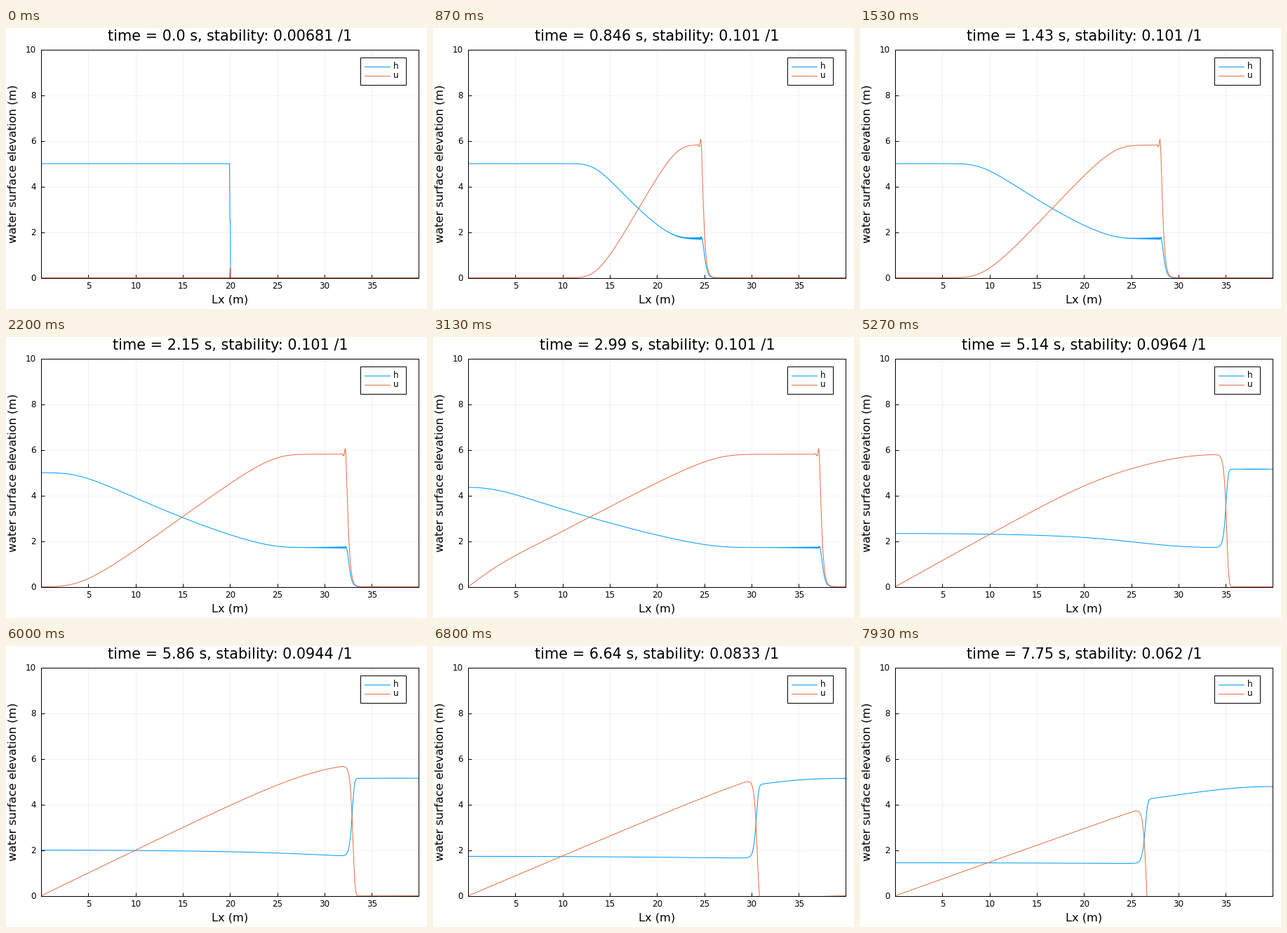
Animation of 600x400 px, one loop 8000 ms. Source, as a matplotlib script:

```python
import numpy as np
import matplotlib
import matplotlib.pyplot as plt
from matplotlib.animation import FuncAnimation
from matplotlib.patches import Rectangle

matplotlib.rcParams["path.simplify"] = False
matplotlib.rcParams["font.family"] = "DejaVu Sans"

W, H, DPI = 600, 400, 100
FRAMES = 120
INTERVAL = 66.63                 # a hair under 1/15 s, to land on 10 ms marks
STEPS = 100                      # solver steps between frames

LENGTH, CELLS, G = 40.0, 1024, 9.81
DX = LENGTH / CELLS
RATIO = 1 / 60                   # dt / dx
DT = RATIO * DX
PX = 72 / DPI                    # one pixel in points
SMALL, MEDIUM, LARGE = (pt * 16 / 15 for pt in (8, 11, 14))
BLUE, ORANGE = "#009afa", "#e36f47"


def simulate():
    """Dam break between two walls: averaged step for h, plain step for u."""
    h = np.zeros(CELLS + 2)
    h[:CELLS // 2 + 1] = 5.0
    u = np.zeros(CELLS + 2)
    states = []
    for step in range(STEPS * (FRAMES - 1) + 1):
        h[0], h[-1] = h[1], h[-2]
        u[0], u[-1] = -u[1], -u[-2]
        flux = u * h
        head = 0.5 * u * u + G * h
        h[1:-1] = 0.5 * (h[2:] + h[:-2]) - 0.5 * RATIO * (flux[2:] - flux[:-2])
        u[1:-1] -= 0.5 * RATIO * (head[2:] - head[:-2])
        if step % STEPS == 0:
            states.append((step * DT, h[1:-1].copy(), u[1:-1].copy()))
    return states


def sig3(value):
    text = f"{value:.3g}"
    return text if "." in text else text + ".0"


def label(x, y, text, points, **kw):
    """Text with its baseline at pixel (x, y), y counted from the top."""
    return fig.text(x / W, 1 - y / H, text, fontsize=points, **kw)


def segment(x0, x1, y, color):
    fig.add_artist(plt.Line2D([x0 / W, x1 / W], [1 - y / H] * 2,
                              color=color, lw=PX, zorder=6))


states = simulate()
x = (np.arange(CELLS) + 0.5) * DX

fig = plt.figure(figsize=(W / DPI, H / DPI), dpi=DPI, facecolor="white")
left, right, top, bottom = 50.4, 588.4, 30.6, 355.6
ax = fig.add_axes([left / W, 1 - bottom / H, (right - left) / W, (bottom - top) / H])
ax.set_xlim(x[0], x[-1])
ax.set_ylim(0, 10)
ax.set_xticks(range(5, 40, 5), [""] * 7)
ax.set_yticks(range(0, 11, 2), [""] * 6)
ax.tick_params(direction="in", length=5 * PX, width=PX)
ax.grid(color="black", alpha=0.08, lw=0.5)
ax.set_axisbelow(True)
for spine in ax.spines.values():
    spine.set_linewidth(PX)

for v in range(5, 40, 5):
    px = left + (v - x[0]) / (x[-1] - x[0]) * (right - left)
    label(px, 371, str(v), SMALL, ha="center")
for v in range(0, 11, 2):
    label(43, bottom - v * 32.5 + 4, str(v), SMALL, ha="right")
label(319.5, 392, "Lx (m)", MEDIUM, ha="center")
label(18, 193, "water surface elevation (m)", MEDIUM, ha="right", va="center",
      rotation=90)
title = label(319.5, 18.4, "", LARGE, ha="center")

h_line, = ax.plot([], [], color=BLUE, lw=PX, zorder=2.2)
u_line, = ax.plot([], [], color=ORANGE, lw=PX, zorder=2.2)

fig.add_artist(Rectangle((505.4 / W, 1 - 80.6 / H), 65 / W, 39 / H, fc="white",
                         ec="black", lw=PX, transform=fig.transFigure, zorder=5))
for y, name, color in ((54.6, "h", BLUE), (67.6, "u", ORANGE)):
    segment(511, 547, y, color)
    label(552, y + 3.8, name, SMALL, zorder=6)


def draw(k):
    t, h, u = states[k]
    h_line.set_data(x, h)
    u_line.set_data(x, u)
    title.set_text(f"time = {sig3(t)} s, stability: {sig3(u.max() * RATIO)} /1")
    return h_line, u_line, title


anim = FuncAnimation(fig, draw, frames=FRAMES, interval=INTERVAL,
                     init_func=lambda: draw(0), repeat=True, repeat_delay=0)
plt.show()
```
